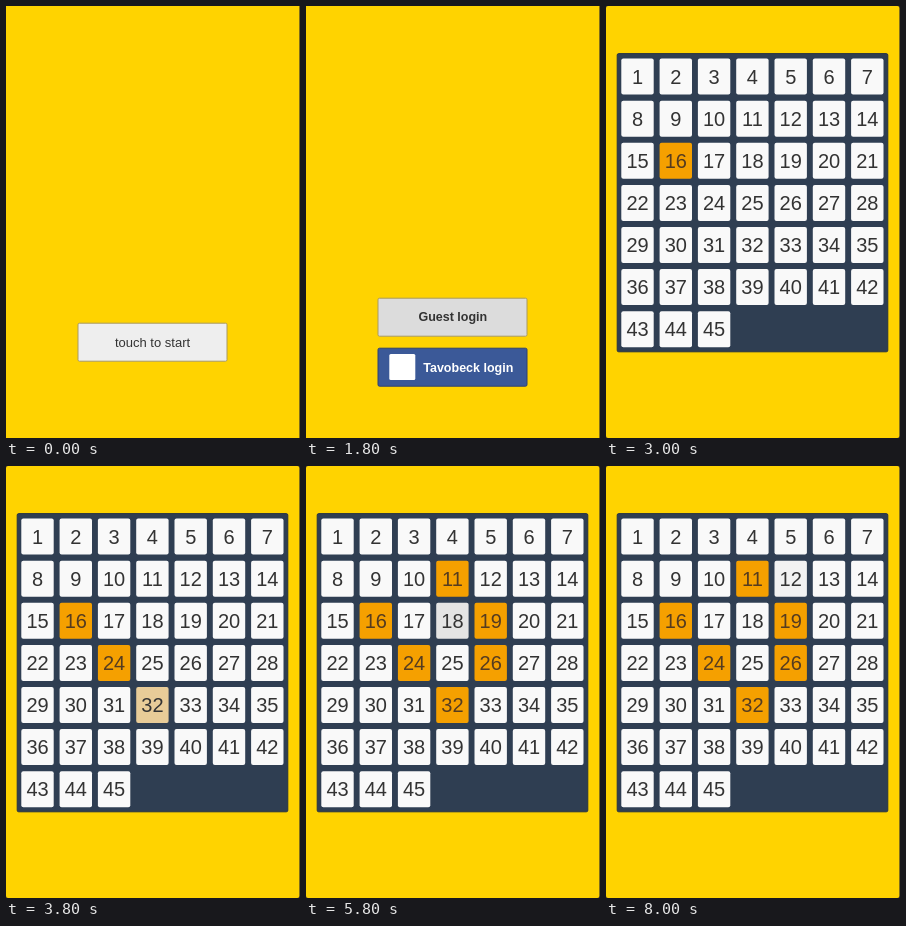
These frames come from a looping animation (294 px wide and 432 px high, 8.1 s). An HTML page:

```html
<!DOCTYPE html>
<html lang="en">
<head>
<meta charset="utf-8">
<title>Number picker</title>
<style>
  html, body { margin: 0; width: 100%; height: 100%; overflow: hidden; background: #2b2b2b; }
  svg { display: block; width: 294px; height: 432px; }
  text { font-family: "Liberation Sans", Arial, sans-serif; fill: #333; text-anchor: middle; }
  .label { font-size: 13px; }
  .bold { font-size: 12.5px; font-weight: bold; }
  #cells text { font-size: 20px; }
  .button { stroke: #a99a62; }
</style>
</head>
<body>
<svg viewBox="0 0 294 432">
  <rect id="stage" width="293.4" height="432" fill="#ffd300"/>

  <g id="start">
    <rect id="startButton" class="button" x="72" y="317.2" width="149" height="38" rx="1.5" fill="#eee"/>
    <text class="label" x="146.5" y="340.5">touch to start</text>
  </g>

  <g id="login">
    <rect id="guestButton" class="button" x="72" y="292.2" width="149" height="38" rx="1.5" fill="#eee"/>
    <text class="bold" x="146.8" y="315.2">Guest login</text>
    <rect x="72" y="342.2" width="149" height="38" rx="1.5" fill="#3b5998" stroke="#2f4170"/>
    <rect x="83.3" y="348" width="26" height="26" rx="1.5" fill="#fff"/>
    <text class="bold" x="162.3" y="365.5" style="fill:#fff">Tavobeck login</text>
  </g>

  <g id="board">
    <rect x="11.2" y="47.6" width="270.6" height="298.2" rx="1.5" fill="#2f3e52" stroke="#283442"/>
    <g id="cells"></g>
  </g>
</svg>
<script>
const LOOP = 8100, STEP = 100, COLUMNS = 7, COUNT = 45;
const LOGIN_AT = 1100, BOARD_AT = 1900;
const PLAIN = '#f9f9f9', HOVER = '#f2f2f2', CHOSEN = '#f5a000';
const PICK = [HOVER, '#dcdcdc', '#e8cc98', CHOSEN];
const REFUSE = [HOVER, '#dcdcdc', '#e4e4e4', HOVER, PLAIN];
const LINGER = [HOVER, '#dcdcdc', '#e4e4e4', HOVER];

// cell number: [time of touch, colours it steps through]
const touches = {
  16: [2700, PICK], 24: [3200, PICK], 32: [3600, PICK],
  26: [4200, PICK], 19: [4600, PICK], 11: [5100, PICK],
  18: [5600, REFUSE], 12: [6600, LINGER]
};

const byId = id => document.getElementById(id);

function add(tag, attrs) {
  const el = document.createElementNS('http://www.w3.org/2000/svg', tag);
  for (const key in attrs) el.setAttribute(key, attrs[key]);
  return byId('cells').appendChild(el);
}

const cells = [], digits = [];
for (let n = 1; n <= COUNT; n++) {
  const x = 31.5 + (n - 1) % COLUMNS * 38.3;
  const y = 70.6 + Math.floor((n - 1) / COLUMNS) * 42.1;
  cells[n] = add('rect', { x: x - 16.2, y: y - 18, width: 32.4, height: 36, rx: 2, fill: PLAIN });
  digits[n] = add('text', { x, y: y + 7.2 });
  digits[n].textContent = n;
}

function colourAt(t, start, colours, before) {
  const i = Math.floor((t - start) / STEP);
  return i < 0 ? before : colours[Math.min(i, colours.length - 1)];
}

function show(id, visible) {
  byId(id).style.display = visible ? '' : 'none';
}

function draw(t) {
  show('start', t < LOGIN_AT);
  show('login', t >= LOGIN_AT && t < BOARD_AT);
  show('board', t >= BOARD_AT);
  byId('stage').setAttribute('rx', t >= BOARD_AT ? 2 : 0);
  byId('startButton').setAttribute('fill', colourAt(t, 900, ['#d2d2d2', '#dcdcdc'], '#eee'));
  byId('guestButton').setAttribute('fill', colourAt(t, 1700, ['#d2d2d2', '#dcdcdc'], '#eee'));
  for (const n in touches) {
    const [start, colours] = touches[n];
    const fill = colourAt(t, start, colours, PLAIN);
    cells[n].setAttribute('fill', fill);
    digits[n].style.fill = fill === CHOSEN ? '#553c20' : '';
  }
}

const origin = performance.now();
function tick() {
  draw((performance.now() - origin) % LOOP);
  requestAnimationFrame(tick);
}
tick();
</script>
</body>
</html>
```
